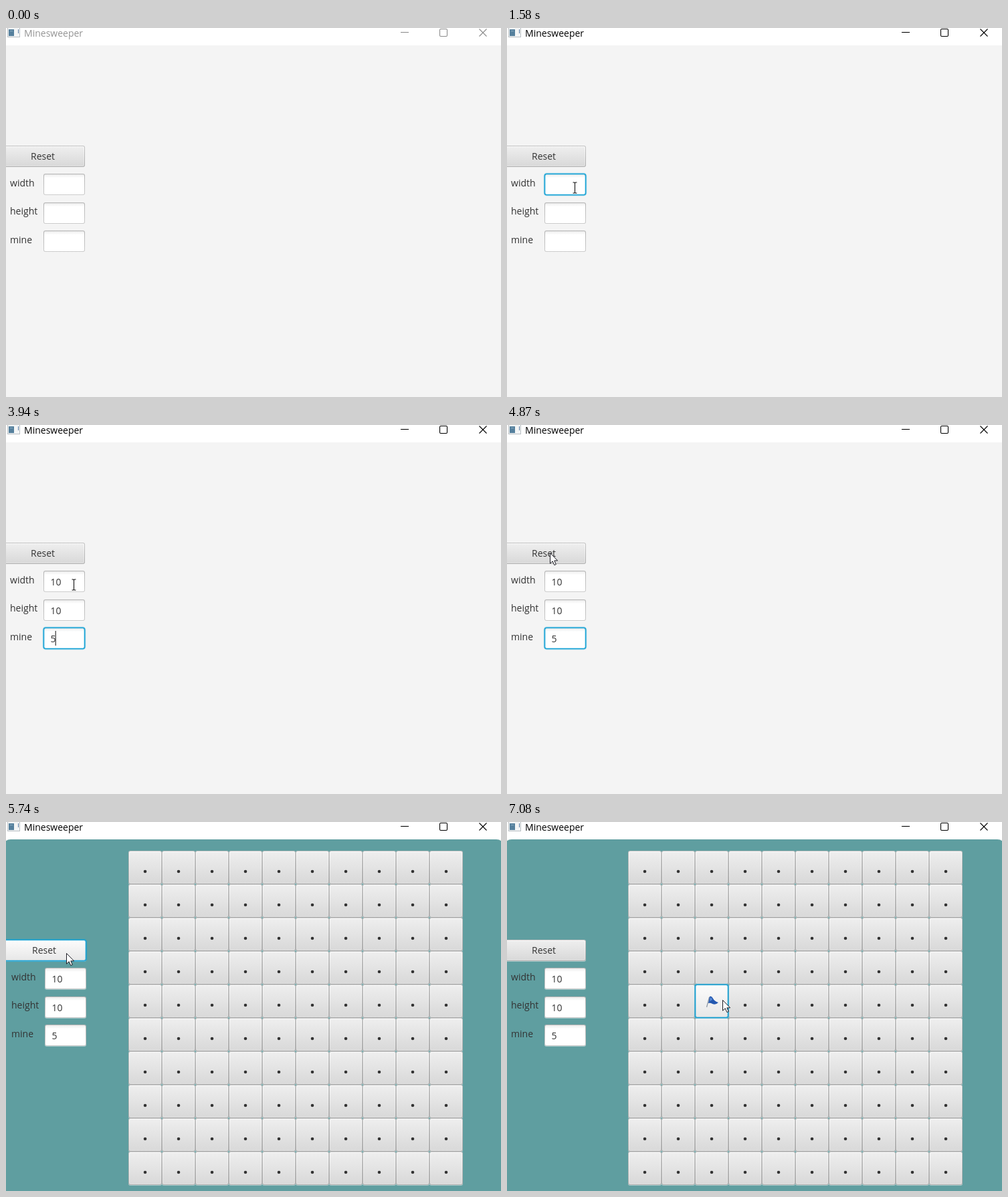
An HTML page that plays this animation: 740 by 552 pixels, repeating every 8000 ms.

```html
<!DOCTYPE html>
<html lang="en">
<head>
<meta charset="utf-8">
<title>Minesweeper</title>
<style>
  html, body { margin: 0; width: 100%; height: 100%; overflow: hidden; background: #f4f4f4; }
  svg { display: block; width: 740px; height: 552px; }
  text { font: 14px "Open Sans", "Noto Sans", sans-serif; fill: #333; }
  #title { fill: #949494; }
  #controls { fill: none; stroke: #8c8c8c; stroke-width: 1.1; }
  .active #title { fill: #000; }
  .active #controls { stroke: #000; }
  .ring { fill: none; stroke: #1ba3d6; stroke-width: 1.6; }
  .glow { fill: none; stroke: #039ed3; stroke-opacity: .2; stroke-width: 3.4; }
</style>
</head>
<body>
<svg id="stage" viewBox="0 0 740 552">
  <defs>
    <linearGradient id="edge" x2="0" y2="1"><stop stop-color="#c2c2c2"/><stop offset="1" stop-color="#adadad"/></linearGradient>
    <linearGradient id="shine" x2="0" y2="1"><stop stop-color="#fbfbfb"/><stop offset="1" stop-color="#e0e0e0"/></linearGradient>
    <linearGradient id="normal" x2="0" y2="1"><stop stop-color="#eeeeee"/><stop offset="1" stop-color="#d9d9d9"/></linearGradient>
    <linearGradient id="hover" x2="0" y2="1"><stop stop-color="#fbfbfb"/><stop offset="1" stop-color="#e8e8e8"/></linearGradient>
    <linearGradient id="pressed" x2="0" y2="1"><stop stop-color="#dedede"/><stop offset="1" stop-color="#c8c8c8"/></linearGradient>
    <linearGradient id="fieldEdge" x2="0" y2="1"><stop stop-color="#b3b3b3"/><stop offset="1" stop-color="#cacaca"/></linearGradient>
    <linearGradient id="fieldFill" x2="0" y2="1"><stop stop-color="#ececec"/><stop offset=".17" stop-color="#fff"/></linearGradient>
  </defs>

  <rect width="740" height="552" fill="#f4f4f4"/>
  <rect width="740" height="26" fill="#fff"/>
  <rect id="pane" x="-5" y="26" width="750" height="560" rx="12" fill="#5f9ea0"/>

  <g id="titleBar">
    <rect x="2.5" y="-.5" width="18" height="14" fill="#f3f5f6" stroke="#b9bfc3"/>
    <rect x="4" y="2" width="8" height="10" fill="#55809d"/>
    <path d="M6 4.5h4" stroke="#86a9c0"/>
    <path d="M18.5 2v6" stroke="#5d7fa5"/>
    <text id="title" x="27" y="13">Minesweeper</text>
    <g id="controls">
      <path d="M590 6.5h12"/>
      <rect x="648.5" y="1.5" width="11" height="11" rx="1.5"/>
      <path d="M707.5 1.5l11 11m0-11l-11 11"/>
    </g>
  </g>

  <g id="form"></g>
  <g id="grid"></g>

  <circle id="click" r="15" fill="#ff0" fill-opacity=".47"/>
  <g id="cursor">
    <path id="arrow" d="M.5 .5V16.2L4.2 12.8L6.8 18.6L9.3 17.5L6.8 11.9H11.6Z" fill="#fff" stroke="#1c1c24"/>
    <g id="beam" fill="none">
      <path d="M-3-8h2.2L0-7.2L.8-8H3M0-7V7M-3 8h2.2L0 7.2L.8 8H3" stroke="#fff" stroke-width="2.4" stroke-opacity=".6"/>
      <path d="M-3-8h2.2L0-7.2L.8-8H3M0-7V7M-3 8h2.2L0 7.2L.8 8H3" stroke="#111" stroke-width="1.1"/>
    </g>
  </g>
</svg>

<script>
const LOOP = 8000, CELL = 50, TOP = 43, SIZE = 10;
const $ = id => document.getElementById(id);

function add(parent, tag, attrs = {}, text = '') {
  const el = document.createElementNS('http://www.w3.org/2000/svg', tag);
  for (const key in attrs) el.setAttribute(key, attrs[key]);
  el.textContent = text;
  return parent.appendChild(el);
}
const box = (parent, x, y, width, height, rx, fill) =>
  add(parent, 'rect', { x, y, width, height, rx, fill });
const show = (el, on) => el.setAttribute('visibility', on ? 'visible' : 'hidden');
const move = (el, x, y) => el.setAttribute('transform', `translate(${x} ${y})`);
const between = (t, from, to) => t >= from && t < to;
const latest = (steps, t) => steps.filter(step => step[0] <= t).pop();

function addButton(parent, x, y, w, h) {
  box(parent, x, y + 1, w, h, 3, '#ffffff').setAttribute('fill-opacity', .45);
  box(parent, x, y, w, h, 3, 'url(#edge)');
  box(parent, x + 1, y + 1, w - 2, h - 2, 2, 'url(#shine)');
  return box(parent, x + 2, y + 2, w - 4, h - 4, 1.5, 'url(#normal)');
}

function addRing(parent, x, y, w, h) {
  const ring = add(parent, 'g');
  for (const name of ['glow', 'ring'])
    box(ring, x + .3, y + .3, w - .6, h - .6, 3, 'none').setAttribute('class', name);
  return ring;
}

// Form
const form = $('form');
const resetBody = addButton(form, -8, 176, 126, 32);
const resetRing = addRing(form, -8, 176, 126, 32);
add(form, 'text', { x: 37, y: 197 }, 'Reset');

function addField(label, y, labelY, from, to, typed) {
  add(form, 'text', { x: 6, y: labelY }, label);
  box(form, 56, y + 1, 62, 32, 3, '#fff').setAttribute('fill-opacity', .45);
  box(form, 56, y, 62, 32, 3, 'url(#fieldEdge)');
  box(form, 57, y + 1, 60, 30, 2, 'url(#fieldFill)');
  return {
    y, from, to, typed,
    ring: addRing(form, 56, y, 62, 32),
    value: add(form, 'text', { x: 66.5, y: y + 22 })
  };
}
const fields = [
  addField('width', 218, 237, 1390, 2720, [[0, ''], [1860, '1'], [2460, '10']]),
  addField('height', 261, 279, 2720, 3470, [[0, ''], [2990, '1'], [3270, '10']]),
  addField('mine', 303, 322, 3470, 5140, [[0, ''], [3940, '5']])
];
const caret = box(form, 65.6, 5, 1.2, 22, 0, '#333');
const caretGaps = [[1580, 1860], [2390, 2460], [4470, 4930]];

// Board
const grid = $('grid'), cells = [];
for (let row = 0; row < SIZE; row++) {
  for (let col = 0; col < SIZE; col++) {
    const x = col * CELL, y = TOP + row * CELL;
    const body = addButton(grid, x, y, CELL, CELL);
    const dot = add(grid, 'circle', { cx: x + 25, cy: y + 31, r: 2.3, fill: '#333' });
    cells.push({ body, dot });
  }
}
const flagged = cells[4 * SIZE + 2];
const cellRing = addRing(grid, 2 * CELL, TOP + 4 * CELL, CELL, CELL);
const flag = add(grid, 'g', { transform: 'translate(116 259)' });
add(flag, 'path', { d: 'M5.5 3L1.5 18', stroke: '#8f9aa6', 'stroke-width': 1.3 });
add(flag, 'path', { d: 'M6 2Q9 1 11 5Q13 9 19 11Q15 15 10 13Q7 11 4 12Z', fill: '#2458b0' });
add(flag, 'path', { d: 'M7 3Q9 4 10 7L6 9Z', fill: '#5d8fd8' });

// Pointer steps: time, x, y, text beam
const pointer = [
  [390, 575, 518], [460, 395, 447], [530, 202, 363],
  [790, 188, 343], [860, 148, 296], [920, 108.5, 246, 1], [990, 103, 241, 1],
  [1050, 101.5, 239, 1], [1120, 106, 242, 1], [1180, 110.5, 245, 1], [1580, 101.5, 239, 1],
  [4670, 88, 222], [4740, 64, 204], [4800, 38, 186], [4870, 64, 191], [4930, 90, 196],
  [5810, 127, 201], [5880, 162, 211], [5950, 205, 226], [6020, 246, 241],
  [6090, 282, 254], [6160, 308, 262], [6230, 322, 266]
];

function render(t) {
  const [, px, py, beam] = latest(pointer, t) || [0, -50, -50];
  const shift = between(t, 5140, 6820) ? 2 : 0;
  const playing = t >= 5740;
  $('stage').classList.toggle('active', t >= 1390);

  move($('cursor'), px, py);
  show($('arrow'), !beam);
  show($('beam'), beam);
  move($('click'), 90, 196);
  show($('click'), between(t, 5140, 5400));

  move(form, shift, 0);
  const resetState = between(t, 5140, 5740) ? 'pressed' : between(t, 5740, 5810) ? 'hover' : 'normal';
  resetBody.setAttribute('fill', `url(#${resetState})`);
  show(resetRing, between(t, 5140, 6820));

  let focused;
  for (const field of fields) {
    const active = between(t, field.from, field.to);
    field.value.textContent = latest(field.typed, t)[1];
    show(field.ring, active);
    if (active) focused = field;
  }
  show(caret, focused && !caretGaps.some(gap => between(t, ...gap)));
  if (focused) move(caret, focused.value.textContent.length * 8, focused.y);

  const left = 181 + shift;
  const col = Math.floor((px - left) / CELL), row = Math.floor((py - TOP) / CELL);
  const hovered = col >= 0 && col < SIZE ? cells[row * SIZE + col] : null;
  show($('pane'), playing);
  grid.style.display = playing ? '' : 'none';
  move(grid, left, 0);
  for (const cell of cells)
    cell.body.setAttribute('fill', cell === hovered ? 'url(#hover)' : 'url(#normal)');
  show(cellRing, t >= 6820);
  show(flag, t >= 7080);
  show(flagged.dot, t < 7080);
}

const start = performance.now();
function tick() {
  render((performance.now() - start) % LOOP);
  requestAnimationFrame(tick);
}
tick();
</script>
</body>
</html>
```
